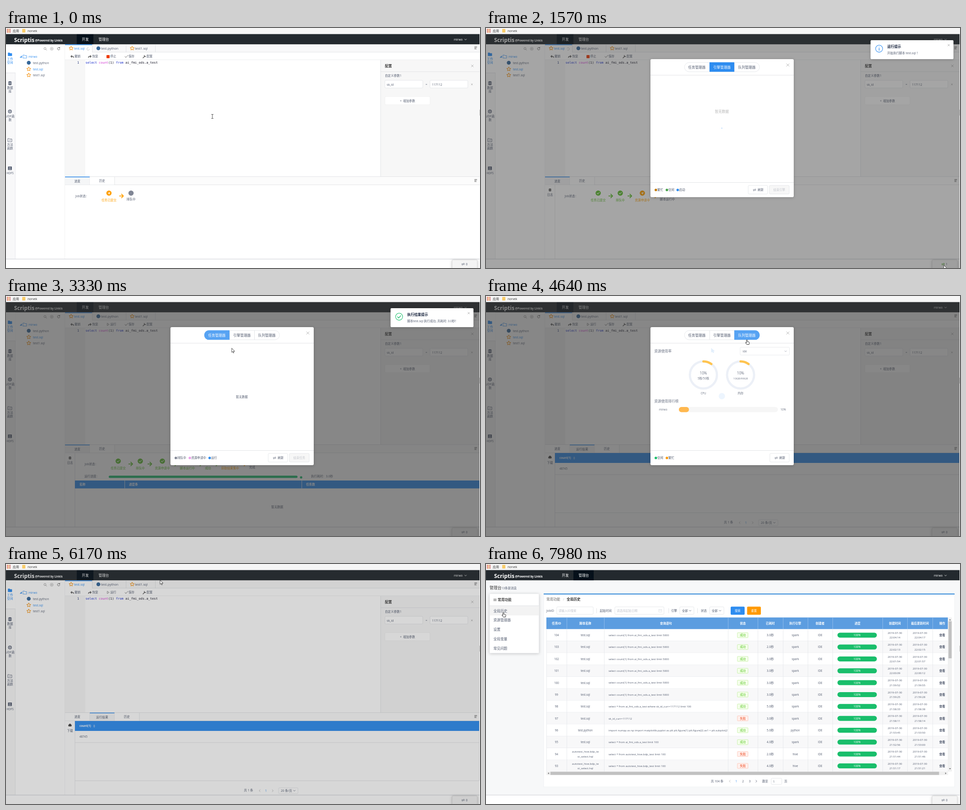
Animation, 1052 px wide and 532 px high, one loop 8 s. Source, as an HTML page:

```html
<!DOCTYPE html>
<html lang="zh">
<head>
<meta charset="utf-8">
<style>
html, body { margin: 0; width: 100%; height: 100%; overflow: hidden; background: #fff; }
svg { display: block; width: 1052px; height: 532px; font-family: "Open Sans", "Noto Sans CJK SC", "Noto Sans CJK", sans-serif; }
.mono { font-family: "DejaVu Sans Mono", monospace; }
.mid { text-anchor: middle; }
.b { font-weight: 700; }
.shadow { filter: drop-shadow(0 1px 3px #0003); }
</style>
</head>
<body>
<svg id="stage" viewBox="0 0 1052 532"></svg>
<script>
const BLUE = '#2d8cf0', HOVER = '#57a3f3', GREEN = '#19be6b', DONE = '#5cbf2a', ORANGE = '#ff9f00',
  GRAY = '#808695', INK = '#515a6e', LINE = '#dcdee2', PALE = '#f7f7f7';
const USER = 'mirwo', BOOKMARK = 'norvek';
const RIGHT = 1051, BAR_TOP = 13.5, BAR_END = 36.4, MASK_ALPHA = .6;

// Drawing helpers: all return SVG markup; text is placed by its vertical centre.
const text = (x, cy, s, size = 6.6, fill = INK, cls = '') => {
  const px = /[\u2e80-\uffef]/.test(s) ? size : size * .94;
  return `<text x="${x}" y="${cy + size * .37}" font-size="${px}" fill="${fill}" class="${cls}" xml:space="preserve">${s}</text>`;
};
const mid = (x, cy, s, size, fill, cls = '') => text(x, cy, s, size, fill, 'mid ' + cls);
const rect = (x, y, x2, y2, fill, stroke = 'none', r = 0, extra = '') =>
  `<rect x="${x}" y="${y}" width="${x2 - x}" height="${y2 - y}" rx="${r}" fill="${fill}" stroke="${stroke}" stroke-width=".7" ${extra}/>`;
const box = (x, y, x2, y2, fill = '#fff', r = 2) => rect(x, y, x2, y2, fill, LINE, r);
const dot = (x, y, r, fill) => `<circle cx="${x}" cy="${y}" r="${r}" fill="${fill}"/>`;
const ring = (x, y, r, color, w = 1, extra = '') =>
  `<circle cx="${x}" cy="${y}" r="${r}" fill="none" stroke="${color}" stroke-width="${w}" ${extra}/>`;
const path = (d, stroke = INK, w = .8, fill = 'none') =>
  `<path d="${d}" stroke="${stroke}" stroke-width="${w}" fill="${fill}" stroke-linecap="round" stroke-linejoin="round"/>`;
const hline = (x, x2, y, c = LINE) => rect(x, y, x2, y + .8, c);
const vline = (x, y, y2, c = LINE) => rect(x, y, x + .8, y2, c);
const group = (id, ...parts) => `<g id="${id}">${parts.join('')}</g>`;
const cross = (x, y, r, c = '#999') => path(`M${x - r} ${y - r}l${2 * r} ${2 * r}m0 ${-2 * r}l${-2 * r} ${2 * r}`, c, .7);
const chevron = (x, y, c = INK) => path(`M${x - 2} ${y - 1}l2 2 2-2`, c);
const side = (x, y, d, c = INK) => path(`M${x - d} ${y - 2.2}l${2 * d} 2.2 ${-2 * d} 2.2`, c);
const menuIcon = y => path(`M1040 ${y - 2}h5m-5 1.7h5m-5 1.7h3m-3 1.7h4`, '#666', .8);
const folder = (x, y, c, fill) => path(`M${x} ${y}h3l1 1.3h4v5.4h-8z`, c, .8, fill);
const star = (x, y) => {
  const points = Array.from({ length: 10 }, (_, i) => {
    const r = i % 2 ? 2.3 : 4.6, a = i * Math.PI / 5 - Math.PI / 2;
    return `${x + r * Math.cos(a)} ${y + r * Math.sin(a)}`;
  });
  return path(`M${points.join('L')}z`, '#f59a23', 1.1);
};
const python = (x, y) => dot(x, y, 4.3, '#35679a');
const swap = (x, y, c = INK) => path(`M${x - 3} ${y - 1}h6l-1.5-1.5M${x + 3} ${y + 1}h-6l1.5 1.5`, c, .7);

const chrome = () => [
  rect(0, 0, 1052, BAR_TOP, '#f6f6f6'),
  ...Array.from({ length: 9 }, (_, i) =>
    rect(2 + i % 3 * 3, 2 + (i / 3 | 0) * 3, 4 + i % 3 * 3, 4 + (i / 3 | 0) * 3, ['#d9452f', '#e8862c', '#c9504a'][i % 3])),
  text(15, 6, '应用', 7, '#333'), rect(36, 2, 43, 10, '#f9cd6b', 'none', 1), text(48, 6, BOOKMARK, 7, '#333'),
  rect(RIGHT, BAR_TOP, 1052, 532, '#fafafa'), rect(RIGHT, 181, 1052, 194, '#bbb')
].join('');

const topbar = () => [
  rect(0, 13, RIGHT, BAR_END, '#23292e'),
  group('navDev', rect(157, 13, 194, BAR_END, '#05101a')), group('navAdmin', rect(194, 13, 239, BAR_END, '#05101a')),
  text(18, 26, 'Scriptis', 13, '#fff', 'b'), text(64.5, 28, '@Powered by Linkis', 6.6, '#fff', 'b'),
  mid(176, 25, '开发', 7.7, '#fff'), mid(217, 25, '管理台', 7.7, '#fff'),
  text(994, 25, USER, 7, '#fff'), chevron(1020, 25.5, '#fff')
].join('');

const sideItem = (y, icon, a, b, c = INK) => icon + mid(9, y + 10.3, a, 6.6, c) + (b ? mid(9, y + 19, b, 6.6, c) : '');
const sidebar = () => [
  rect(0, BAR_END, 21, 512, '#f8f8f9'), rect(0, BAR_END, 20.5, 99, '#fff'), hline(0, 21, 99), vline(20.4, 99, 512),
  sideItem(58, folder(5, 55, BLUE, BLUE), '工作', '空间', BLUE),
  sideItem(122, rect(5, 118, 12.5, 126.5, INK, 'none', 2.5) + hline(5, 12.5, 120.5, '#fff') + hline(5, 12.5, 123.2, '#fff'), '数据', '库'),
  sideItem(185, ring(8.7, 185, 3.3, INK, 1.5) + dot(8.7, 185, 1.3, INK), 'UDF函', '数'),
  sideItem(248, path('M4.500 245h3l1 1h4.500v6h-8.500z') + mid(8.8, 249, '/x/', 4), '方法', '函数'),
  sideItem(311, rect(4.5, 307, 13, 315, INK, 'none', 1) + ring(8.7, 310, 1.5, '#fff', .7) + hline(6, 11.5, 313, '#fff'), 'HDFS')
].join('');

const tree = () => [
  rect(21, BAR_END, 131, 512, '#fff'), vline(130.6, BAR_END, 512),
  ring(86.5, 45.5, 2.3, '#777', .7), path('M88.300 47.300l2 2', '#777', .7),
  ring(101.5, 46, 3.3, '#888', .6), path('M100 46h3m-1.500-1.500v3', '#888', .6),
  path('M119 44a2.800 2.800 0 1 0 .6 2.500M119.400 42.500v1.800h-1.800', '#444'),
  path('M31 65.500h4v-4z', BLUE, .3, BLUE), folder(38, 60, BLUE, 'none'), text(50, 63, USER, 7, BLUE),
  python(50.5, 77), text(60, 77, 'test.python', 7.1),
  star(50.5, 91), text(60, 91, 'test.sql', 7.1, BLUE), star(50.5, 104.5), text(60, 104.5, 'test1.sql', 7.1)
].join('');

const editor = () => [
  rect(131, BAR_END, 1052, 54, '#f8f8f9'), hline(131, 1052, 53.3),
  rect(131, BAR_END, 191, 54, '#fff'), rect(131, BAR_END, 191, 38, BLUE), ...[191, 266, 331].map(x => vline(x, 37, 54)),
  star(144.5, 45), text(151, 45, 'test.sql', 7.5, BLUE), python(205, 45), text(211, 45, 'test.python', 7.7),
  star(280, 45), text(286, 45, 'test1.sql', 7.7), menuIcon(43.5),
  rect(131, 54, 1052, 71, '#fff'), hline(131, 1052, 70.5),
  path('M146 61l-2 2 2 2M144.500 63h3q2.500 0 2.500 2.500', '#555', 1.3), text(152, 63, '撤销'),
  path('M187 61l2 2-2 2M188.500 63h-3q-2.500 0-2.500 2.500', '#555', 1.3), text(191.5, 63, '恢复'),
  group('stop', rect(223, 60, 230, 67, '#ee3f0e', 'none', 1), text(231.5, 63, '停止')),
  group('run', path('M225 60.500l4 2.500-4 2.500z', '#666', .7), text(231.5, 63, '运行')),
  path('M264 63l2 2.500 4.500-5', '#555'), text(272, 63, '保存'),
  path('M304 66.500l4-4m-1-2a2 2 0 0 0 3 2.500', '#555', 1.3), text(312, 63, '配置'),
  rect(131, 71, 831, 329, '#fff'), rect(131, 71, 176, 329, PALE),
  text(158, 76.5, '1', 7.5, '#237', 'mono'),
  text(176.5, 76.5, '<tspan fill="#1428c8">select</tspan> <tspan fill="#d33bd3">count</tspan>(1) <tspan fill="#1428c8">from</tspan> ai_fmi_ods.a_test', 7.45, '#112', 'mono'),
  rect(831, 71, 1052, 329, PALE), vline(831, 71, 329), text(841, 84, '配置', 7.7, '#333', 'b'), cross(1035, 84, 2.3),
  hline(831, 1052, 96.5), text(841, 106, '自定义参数1'),
  box(841, 116, 925, 133), text(845, 125, 'sk_id', 7), mid(933, 125, '=', 6.6), box(941, 116, 1025, 133),
  text(945.5, 125, '117112', 7), cross(1034, 125, 1.5),
  rect(841, 152, 941, 170, '#fff', '#eee', 2), mid(891, 161.5, '+ &#160;增加参数')
].join('');

// Job steps flow left to right; widths follow the label lengths.
const STEPS = ['任务已提交', '排队中', '资源申请中', '脚本运行中', '成功', '获取结果集中', '完成'];
const steps = (start, active) => {
  let x = start, out = text(start - 58, 373, 'Job状态：');
  STEPS.slice(0, active + 2).forEach((label, i) => {
    const w = label.length * 6.6, c = x + w / 2, color = i < active ? DONE : i === active ? ORANGE : GRAY;
    out += dot(c, 366, 5.8, color) + mid(c, i > active ? 380 : 381.3, label, 6.6, i > active ? INK : color);
    if (i < active) out += path(`M${c - 2.6} 366l2 2 3.400-3.800`, '#fff', 1.1);
    if (i === active) out += path(`M${c - 2.5} 366l5-2-2 5-.8-2.300z`, '#fff', .3, '#fff');
    if (i <= active) out += path(`M${x + w + 7} 372.300h8.500m-4-4l4 4-4 4`, color, 1.8);
    x += w + 22.6;
  });
  return out;
};
const tabs = (active, ...labels) => rect(131, 329, 1052, 512, '#fff') + rect(131, 329, 1052, 348, '#fcfcfc') +
  hline(131, 1052, 329) + hline(131, 1052, 347.3) + menuIcon(337.5) + labels.map((label, i) => {
    const x = 131 + i * 55, on = i === active;
    return rect(x, 330, x + 55, 347.3, on ? '#f5f6f7' : '#fff') + (on ? rect(x, 329.5, x + 55, 331, BLUE) : '') +
      vline(x + 54.6, 330, 348) + mid(x + 27.3, on ? 339.5 : 338.5, label);
  }).join('');
const logColumn = vline(152.6, 348, 512) + rect(139.5, 356, 144.5, 362, '#444', 'none', 1) +
  hline(140.7, 143.3, 357.7, '#fff') + hline(140.7, 143.3, 359.7, '#fff') + mid(142, 370, '日志');
const progress = [
  text(174, 400, '运行进度：'), rect(228, 398.3, 647, 403.3, GREEN, 'none', 2.5), dot(655, 402, 2.6, GREEN),
  text(677, 400, '执行耗时：3.0秒'), rect(153, 409, 1050.5, 426.5, BLUE), vline(263, 409, 426.5, '#fff'), vline(656, 409, 426.5, '#fff'),
  ...[[163, '名称'], [273, '进度条'], [666, '任务数']].map(([x, s]) => text(x, 418, s, 6.6, '#fff', 'b')),
  mid(602, 467.5, '暂无数据')
].join('');
const result = () => [
  tabs(1, '进度', '运行结果', '历史'), vline(152.6, 348, 512),
  dot(140.5, 358, 2.3, '#444'), dot(143.5, 358, 2.3, '#444'), dot(142, 356.5, 2.5, '#444'), mid(142, 370, '下载'),
  rect(153, 348, 1050.5, 370, BLUE), text(163, 359, 'count(1)', 6.6, '#fff', 'b'),
  path('M194 358.300l1.700-1.700 1.700 1.700zM194 360.300l1.700 1.700 1.700-1.700z', '#cde', .2, '#cde'),
  text(163, 383, '48745'), hline(153, 1050, 395.5), hline(153, 1050, 480), vline(1050, 348, 480),
  text(528, 502, '共 1 条'), side(563, 502.5, -1.2, '#aaa'), mid(577, 502.5, '1', 7, BLUE), side(592, 502.5, 1.2, '#aaa'),
  box(605, 496, 648, 509), text(610, 502.5, '20 条/页'), chevron(640, 502.5)
].join('');

const NAV = ['全局历史', '资源管理器', '设置', '全局变量', '常见问题'];
const COLS = [134, 179, 262, 537, 603, 659, 714, 769, 880, 935, 991, 1025];
const HEADS = ['任务ID', '脚本名称', '查询语句', '状态', '已耗时', '执行引擎', '创建者', '进度', '创建时间', '最后更新时间'];
const COUNT = 'select count(1) from ai_fmi_ods.a_test limit 5000';
const HIVE = ['autotest_hive.bdp_te', 'st_select.hql'], HIVE_SQL = 'select * from autotest_hive.bdp_test limit 100';
const ROWS = [
  [3, '22:04:14', '22:04:17'], [2, '22:02:13', '22:02:15'], [3, '22:01:54', '22:01:57'],
  [3, '22:00:09', '22:00:12'], [3, '21:59:52', '21:59:55'], [3, '21:59:25', '21:59:28'],
  [5, '21:58:33', '21:58:38', 'select * from ai_fmi_ods.a_test where sk_id_curr=117112 limit 100'],
  [3, '21:58:11', '21:58:14', 'sk_id_curr=117112', 'fail'],
  [5, '21:53:45', '21:53:50', 'import numpy as np import matplotlib.pyplot as plt plt.figure(1) plt.figure(2) ax1 = plt.subplot(211)', 'ok', 'python'],
  [4, '21:52:56', '21:53:00', 'select * from ai_fmi_ods.a_test limit 100'],
  [2, '21:51:44', '21:51:46', HIVE_SQL, 'fail', 'hive'], [4, '21:51:17', '21:51:21', HIVE_SQL, 'fail', 'hive']
];
const center = i => (COLS[i] + COLS[i + 1]) / 2;
const tableRow = ([secs, made, updated, sql = COUNT, state = 'ok', engine = 'spark'], i) => {
  const top = 144.5 + i * 26.35, y = top + 13.2, ok = state === 'ok';
  const two = (col, a, b) => mid(center(col), y - 5.3, a, 6.5) + mid(center(col), y + 5.3, b, 6.5);
  return rect(134, top, 1025, top + 26.35, i % 2 ? '#f8f8f9' : '#fff') + hline(134, 1025, top + 25.8, '#e4e6ea') +
    mid(center(0), y, String(104 - i)) +
    (engine === 'hive' ? two(1, ...HIVE) : mid(center(1), y, engine === 'python' ? 'test.python' : 'test.sql')) +
    `<g clip-path="url(#sqlClip)">${text(272, y, sql, 6.4)}</g>` +
    rect(558, y - 5.5, 581.5, y + 5.5, ok ? '#f6ffed' : '#fff1ee', ok ? '#b7eb8f' : '#ffb8a5', 1) +
    mid(center(3), y, ok ? '成功' : '失败', 6.6, ok ? '#52c41a' : '#ed4014') +
    mid(center(4), y, secs + '.0秒') + mid(center(5), y, engine) + mid(center(6), y, 'IDE') +
    rect(780, y - 5.5, 867.5, y + 5.5, GREEN, 'none', 5.5) + mid(823.5, y, '100%', 6.6, '#fff') +
    two(8, '2019-07-30', made) + two(9, '2019-07-30', updated) + text(1006, y, '查看', 6.6, INK, 'b');
};
const admin = () => [
  rect(0, BAR_END, 1052, 512, '#f7f8f9'), text(8, 53, '管理台', 8.8, '#333'), text(34.3, 54, '13条新消息'),
  rect(8, 66, 117.5, 197.5, '#fff', '#e8eaec', 1, 'class="shadow"'),
  path('M17 77.500h6m-6 2h6m-6 2h6', '#555', .8), text(26, 79.5, '常用功能', 7.7, '#444', 'b'), hline(8, 117.5, 92),
  group('navHover', rect(8, 93, 117.5, 114, '#f3f3f3')), ...NAV.map((s, i) => text(16.5, 103.7 + i * 20.8, s, 7.7)),
  rect(128, 66, 1040, 494, '#fff', '#eceef0'), rect(128, 65.5, 1040, 67.5, '#2b85d8'),
  text(134, 78, '常用功能', 7.7, '#666'), text(171, 78, '/', 7, '#bbb'), text(179, 78, '全局历史', 7.7, '#333', 'b'),
  text(134, 103.5, 'JobID', 7.2), box(157, 95, 238, 111.5), text(161, 103.5, '请输入ID搜索', 6.6, '#c0c4cc'),
  ...[245, 405, 469].map(x => vline(x, 98, 109)),
  text(252.5, 103.5, '起始时间'), box(286, 95, 395, 111.5), text(290, 103.5, '请选择起始日期', 6.6, '#c0c4cc'),
  box(383.5, 100.5, 390, 106.5, '#fff', 0), hline(383.5, 390, 102.2),
  text(411, 103.5, '引擎'), box(430, 95, 461.5, 111.5), text(435, 103.5, '全部'), chevron(453, 103.5),
  text(477, 103.5, '状态'), box(496.5, 95, 528, 111.5), text(501, 103.5, '全部'), chevron(519.5, 103.5),
  rect(543, 94.5, 574, 112.5, BLUE, 'none', 2), mid(558.5, 103.8, '搜索', 6.6, '#fff'),
  rect(579.5, 94.5, 610, 112.5, '#ff9900', 'none', 2), mid(594.5, 103.8, '重置', 6.6, '#fff'),
  rect(134, 118.5, 1025, 144.5, '#5c9de0'), ...HEADS.map((s, i) => mid(center(i), 131.5, s, 6.6, '#fff', 'b')),
  text(1006, 131.5, '操作', 6.6, '#fff', 'b'),
  ...COLS.slice(1, 11).map(x => vline(x, 118.5, 144.5, '#9cc4ee')),
  group('history', ...ROWS.map(tableRow), ...COLS.map(x => vline(x, 144.5, 460, '#e4e6ea')),
    rect(1025.5, 118.5, 1034, 460, '#f1f1f1'), rect(1026.5, 127, 1033.5, 209, '#c1c1c1'),
    path('M1028 124.500l1.800-2 1.800 2zM1028 453l1.800 2 1.800-2z', '#555', .2, '#555'),
    rect(134, 460, 1025.5, 468, '#f1f1f1'), rect(143, 460.5, 1005.5, 467.5, '#c1c1c1'),
    path('M139.500 462.300l-2 1.700 2 1.700zM1019.500 462.300l2 1.700-2 1.700z', '#555', .2, '#555'),
    text(499, 481.5, '共 104 条'), side(541, 481.5, -1.2, '#aaa'), mid(555.5, 481.5, '1', 7, BLUE), mid(570.5, 481.5, '2', 7),
    mid(585.5, 481.5, '3', 7), side(600, 481.5, 1.2), text(613, 481.5, '跳至'), box(633, 475, 656.5, 488.5),
    text(637, 482, '1', 7), text(662, 481.5, '页'))
].join('');

const footer = () => rect(0, 512, 1052, 532, '#fff') + rect(0, 511.5, 1052, 513, LINE) +
  rect(990, 514, 1046, 534, '#f4f4f4', '#ccc', 2, 'class="shadow"') + swap(1014.5, 523.5) +
  group('count0', text(1020.5, 523.5, '0', 7.4)) + group('count1', text(1020.5, 523.5, '1', 7.4), swap(1014.5, 523.5, DONE));

const notice = (id, color, sign, title, body) => group(id, rect(853.5, 27, 1037.5, 69, '#fff', 'none', 2, 'class="shadow"'),
  ring(872.5, 45.8, 7.8, color, 1.1), path(sign, color, 1.3), text(890.5, 41, title, 7.7, '#17233d', 'b'),
  text(890.5, 55.5, body), cross(1027, 38, 2));

const MANAGERS = ['任务管理器', '引擎管理器', '队列管理器'];
const pill = (i, color) => `<g clip-path="url(#pillClip)">${rect([440, 496, 551][i], 76, [496, 551, 608][i], 97, color)}</g>` +
  mid([468, 523.8, 579][i], 87, MANAGERS[i], 7.7, '#fff');
const legend = items => items.map(([x, color, s]) => dot(x, 359, 2.8, color) + text(x + 3.2, 359, s)).join('');
const refresh = x => box(x, 349, x + 43, 368) + swap(x + 14, 359) + text(x + 21, 358.5, '刷新');
const closeJob = s => refresh(582) + box(629, 349, 673, 368, PALE) + mid(651, 359, s, 6.6, '#c5c8ce');
const gauge = (x, used, name) => ring(x, 175, 30, '#eaeef6', 5) +
  ring(x, 175, 30, '#ffbb33', 5, `pathLength="100" stroke-dasharray="10 90" stroke-linecap="round" transform="rotate(-90 ${x} 175)"`) +
  mid(x, 171, '10%', 8.6) + mid(x, 182.5, used, 6.3) + mid(x, 215.5, name);
const modal = () => [
  rect(365, 69, 683, 375, '#fff', 'none', 3, 'class="shadow"'), hline(365, 683, 104), hline(365, 683, 342), cross(670, 82, 3),
  rect(440.5, 76.5, 607, 97, '#fff', LINE, 10.3), vline(496, 76.5, 97), vline(551, 76.5, 97),
  ...MANAGERS.map((s, i) => mid([468, 523.8, 579][i], 87, s, 7.7)),
  group('engines', pill(1, BLUE), legend([[377, '#c27a0a', '繁忙'], [401.5, '#43a047', '空闲'], [425.5, BLUE, '启动']]), closeJob('结束引擎'),
    group('enginesBusy', mid(523.5, 185, '暂无数据', 7.7, '#ccc', 'b')), group('enginesIdle', mid(523.5, 223.5, '暂无数据'))),
  group('tasks', pill(0, HOVER), legend([[377, GRAY, '排队中'], [408, '#eda0ea', '资源申请中'], [452, BLUE, '运行']]),
    closeJob('结束任务'), mid(523.5, 223.5, '暂无数据')),
  group('queues', pill(2, HOVER), legend([[377, GREEN, '空闲'], [401.5, '#ff9900', '繁忙']]), refresh(630)),
  group('usage', text(373.5, 122.5, '资源使用率', 7.7), box(564, 113.5, 673.5, 131), text(569.5, 122.5, 'ide', 7), chevron(665, 122.5, GRAY),
    gauge(482.5, '5核/50核', 'CPU'), gauge(565, '10GB/99GB', '内存'), text(373.5, 233.5, '资源使用排行榜', 7.7),
    text(384, 252, USER), rect(428, 246, 648, 257.5, '#f5f5f5', 'none', 5.7), rect(428, 246, 450.5, 257.5, '#ffad33', 'none', 5.7), text(653.5, 252, '10%')),
  group('ghost', path('M500 116v9l2-2 2 3 2-1-2-3h3z', '#dcebfa', .5, '#e2effc')),
  '<circle id="spin" cx="523.5" cy="222" fill="#2d8cf0"/>'
].join('');

const cursors = () => group('beam', path('M-2-4.500h1.500q.5 0 .5.500q0-.500.500-.500h1.500M-2 4.500h1.500q.5 0 .5-.500q0 .500.500.500h1.500M0-4v8', '#222', .8)) +
  group('arrow', path('M0 0v9l2.100-1.900 1.500 3.200 1.400-.6-1.500-3.100h2.800z', '#222', .8, '#fff')) +
  group('hand', path('M-1 1.800q1-1.300 2 0v3.400l3 .5q1.600.4 1.500 2l-.7 3.800h-5l-3-4q.3-1.300 1.700-.3l.5.600z', '#222', .9, '#fff'));

const stage = document.getElementById('stage');
stage.innerHTML = `<defs><clipPath id="sqlClip">${rect(262, 118, 536.5, 460, '#000')}</clipPath>
  <clipPath id="pillClip">${rect(440, 76, 607.5, 97.3, '#000', 'none', 10.6)}</clipPath></defs>` + [
  topbar(),
  group('workspace', sidebar(), tree(), editor(),
    group('tabSpin', ring(0, 0, 2.8, '#aaa', .7, 'stroke-dasharray="14 4"')),
    group('queued', tabs(0, '进度', '历史'), steps(212, 0)),
    group('applying', tabs(0, '进度', '历史'), logColumn, steps(232.5, 2)),
    group('running', tabs(0, '进度', '历史'), logColumn, steps(232.5, 3), progress),
    group('fetching', tabs(0, '进度', '历史'), logColumn, steps(232.5, 5), progress),
    group('result', result())),
  group('admin', admin()), footer(),
  group('mask', rect(0, BAR_TOP, RIGHT, 532, '#373737')), group('modal', modal()),
  group('notices', notice('started', BLUE, 'M872.500 44.700v5m0-8v.1', '运行提示', '开始执行脚本 test.sql ！'),
    notice('finished', GREEN, 'M869 46l2.500 2.700 4.500-5', '执行结果提示', '脚本test.sql 执行成功, 共耗时: 3.0秒！')),
  chrome(), group('cursor', cursors())
].join('');

const el = Object.fromEntries([...stage.querySelectorAll('[id]')].map(node => [node.id, node]));
const show = (id, on) => { el[id].style.display = on ? '' : 'none'; };
const ramp = (t, from, to) => Math.min(1, Math.max(0, (t - from) / (to - from)));

// Time, position and shape of the pointer.
const POINTER = [
  [0, 458, 196, 'beam'], [150, 458, 196, 'beam'], [470, 840, 390, 'arrow'], [860, 1016, 526, 'arrow'], [1810, 1016, 526, 'arrow'],
  [2500, 470, 90, 'hand'], [2850, 470, 90, 'hand'], [3200, 501, 116, 'arrow'], [3600, 501, 116, 'arrow'], [4150, 579, 96, 'hand'],
  [5210, 579, 96, 'hand'], [5900, 670, 80, 'hand'], [6020, 670, 80, 'arrow'], [6170, 342, 36, 'arrow'], [6520, 217, 24, 'hand'],
  [6890, 217, 24, 'hand'], [7580, 36, 103, 'hand'], [7730, 36, 103, 'hand'], [7980, 38.5, 106, 'hand'], [8000, 38.5, 106, 'hand']
];
function movePointer(t) {
  const i = POINTER.findLastIndex(k => k[0] <= t), a = POINTER[i], b = POINTER[i + 1] || a;
  const p = b === a ? 0 : ramp(t, a[0], b[0]), e = p * p * (3 - 2 * p);
  el.cursor.setAttribute('transform', `translate(${a[1] + (b[1] - a[1]) * e} ${a[2] + (b[2] - a[2]) * e})`);
  for (const kind of ['beam', 'arrow', 'hand']) show(kind, kind === a[3]);
}

function render(t) {
  const busy = t < 2900, onAdmin = t >= 6650;
  show('workspace', !onAdmin); show('admin', onAdmin); show('navDev', !onAdmin); show('navAdmin', onAdmin);
  show('history', t >= 6950); show('navHover', t >= 7400);
  show('stop', busy); show('run', !busy); show('tabSpin', busy);
  el.tabSpin.setAttribute('transform', `translate(182.3 46.5) rotate(${t * .36})`);
  const phases = [['queued', 0], ['applying', 1000], ['running', 2050], ['fetching', 2900], ['result', 3620]];
  phases.forEach(([id, from], i) => show(id, t >= from && t < (phases[i + 1] || [0, Infinity])[1]));
  const counting = t >= 930 && busy;
  show('count0', !counting); show('count1', counting);

  el.mask.style.opacity = MASK_ALPHA * (t < 4000 ? ramp(t, 1370, 1640) : 1 - ramp(t, 6020, 6245));
  const open = t < 4000 ? ramp(t, 1400, 1550) : 1 - ramp(t, 6010, 6130), scale = .8 + .2 * open;
  el.modal.style.opacity = open;
  el.modal.setAttribute('transform', `translate(524 222) scale(${scale}) translate(-524 -222)`);
  show('engines', t < 2750); show('tasks', t >= 2750 && t < 4200); show('queues', t >= 4200);
  show('enginesBusy', t < 2100); show('enginesIdle', t >= 2100);
  el.usage.style.opacity = ramp(t, 4400, 4680);
  show('ghost', t >= 4200 && t < 4720);

  const first = t < 2100, phase = ((t - (first ? 1500 : 3940)) % 1000 + 1000) % 1000 / 1000;
  show('spin', t >= 1500 && first || t >= 4200 && t < 4900);
  el.spin.setAttribute('r', 10 * phase);
  el.spin.style.opacity = (1 - phase) * (first ? 1 : 1 - ramp(t, 4400, 4740));

  const enter = 1 - (1 - ramp(t, 1177, 1477)) ** 3, leave = ramp(t, 3560, 3860) ** 2, shown = enter - leave;
  show('notices', shown > 0); show('started', busy); show('finished', !busy);
  el.notices.style.opacity = shown;
  el.notices.setAttribute('transform', `translate(${198 * (1 - shown)} 0)`);
  movePointer(t);
}

const begin = performance.now();
function tick() {
  render((performance.now() - begin) % 8000);
  requestAnimationFrame(tick);
}
tick();
</script>
</body>
</html>
```
